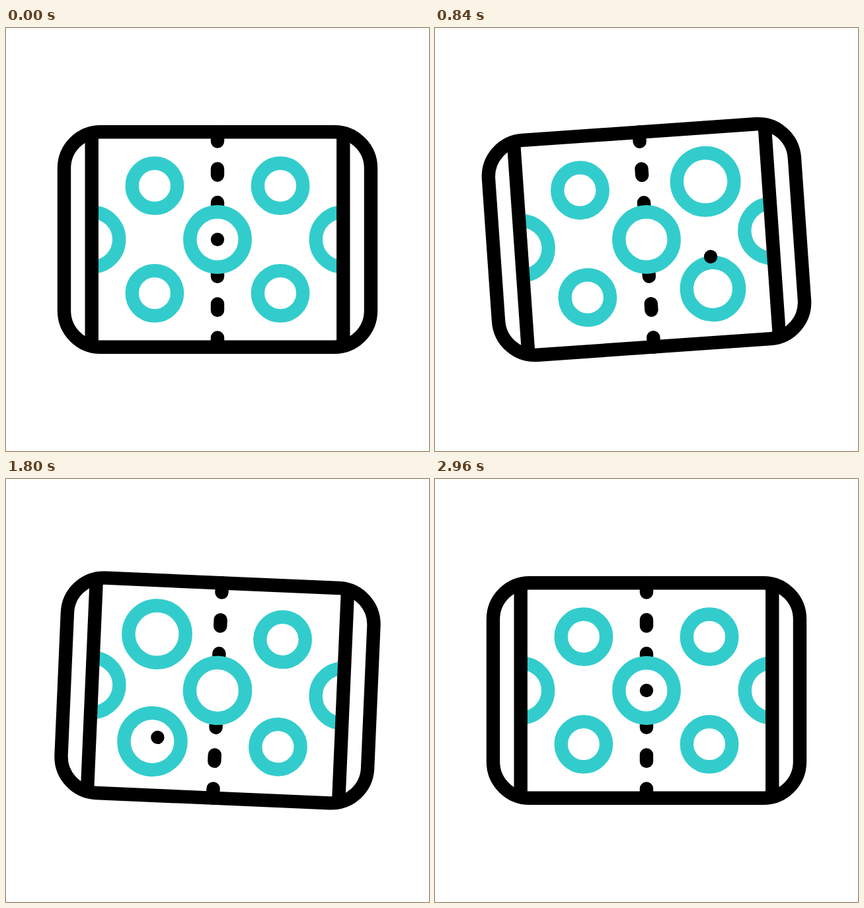
Recreate the animation shown at these times as an HTML page. Size 640x640 px, loop 3000 ms.

```html
<!DOCTYPE html>
<html lang="en">
<head>
<meta charset="utf-8">
<title>Air hockey table</title>
<style>
html, body { margin: 0; width: 100%; height: 100%; overflow: hidden; background: #fff; }
svg { display: block; width: 100vw; height: 100vh; }
#board { fill: none; stroke: #000; stroke-width: 20.4; }
.teal { stroke: #33cccc; }
#dashes { stroke-linecap: round; }
#puck { fill: #000; stroke: none; }
</style>
</head>
<body>
<svg viewBox="-320 -320 640 640">
  <g id="board">
    <path class="teal" d="M-190.3 -41.5a41.5 41.5 0 0 1 0 83M190.3 -41.5a41.5 41.5 0 0 0 0 83"/>
    <path id="dashes" d="M0 -163V-148.5M0 -107V-97.5M0 -56V-52M0 52V56M0 97.5V107M0 148.5V163"/>
    <rect x="-232" y="-162.8" width="464" height="325.6" rx="55"/>
    <path d="M-190.3 -163V163M190.3 -163V163"/>
    <g id="rings" class="teal"></g>
    <circle id="puck" r="10.2"/>
  </g>
</svg>
<script>
const LOOP = 3000, STEP = 40, REST = 2960;
const SWING = 350, SWELL = 440;
const board = document.getElementById('board');
const puck = document.getElementById('puck');

const progress = (t, from, span) => Math.min(1, Math.max(0, (t - from) / span));
const smooth = p => p * p * (3 - 2 * p);
const eased = (t, from, span) => smooth(progress(t, from, span));

// Spots on the board, relative to its centre
const DX = 95.1, DY = 81.3;
const spots = {
  centre: [0, 0],
  topRight: [DX, -DY], bottomRight: [DX, DY],
  topLeft: [-DX, -DY], bottomLeft: [-DX, DY],
  farRight: [129.6, -101.6], farLeft: [-88.6, 97.6]
};

// The puck runs straight from spot to spot, arriving at these times
const route = Object.entries({
  topRight: 561, bottomRight: 959, topLeft: 1333, bottomLeft: 1767,
  centre: 2178, farRight: 2560, farLeft: 2920
});

function puckAt(t) {
  let [x, y] = spots.centre, left = 45;
  for (const [name, arrival] of route) {
    const p = progress(t, left, arrival - left);
    const [toX, toY] = spots[name];
    x += (toX - x) * p;
    y += (toY - y) * p;
    if (p < 1) break;
    left = arrival;
  }
  return [x, y];
}

const tiltAt = t =>
  -4 * eased(t, 295, SWING) + 10 * eased(t, 980, SWING) - 6 * eased(t, 1605, SWING);

// Adds a ring that swells from time up and shrinks from time down
function addRing(name, up, down = LOOP) {
  const [base, growth] = name === 'centre' ? [41.7, 7.5] : [34.2, 9.3];
  const el = document.createElementNS('http://www.w3.org/2000/svg', 'circle');
  el.setAttribute('cx', spots[name][0]);
  el.setAttribute('cy', spots[name][1]);
  document.getElementById('rings').append(el);
  return t => el.setAttribute('r',
    base + growth * (eased(t, up, SWELL) - eased(t, down, SWELL)));
}

const rings = [
  addRing('topRight', 365, 800),
  addRing('bottomRight', 594, 1220),
  addRing('topLeft', 960, 1745),
  addRing('bottomLeft', 1420, 2030),
  addRing('centre', 1740)
];

function draw(elapsed) {
  let t = Math.floor((elapsed % LOOP) / STEP) * STEP;
  if (t >= REST) t = 0;
  board.setAttribute('transform', `rotate(${tiltAt(t)})`);
  const [x, y] = puckAt(t);
  puck.setAttribute('cx', x);
  puck.setAttribute('cy', y);
  rings.forEach(setRadius => setRadius(t));
}

const start = performance.now();
function tick() {
  draw(performance.now() - start);
  requestAnimationFrame(tick);
}
tick();
</script>
</body>
</html>
```
